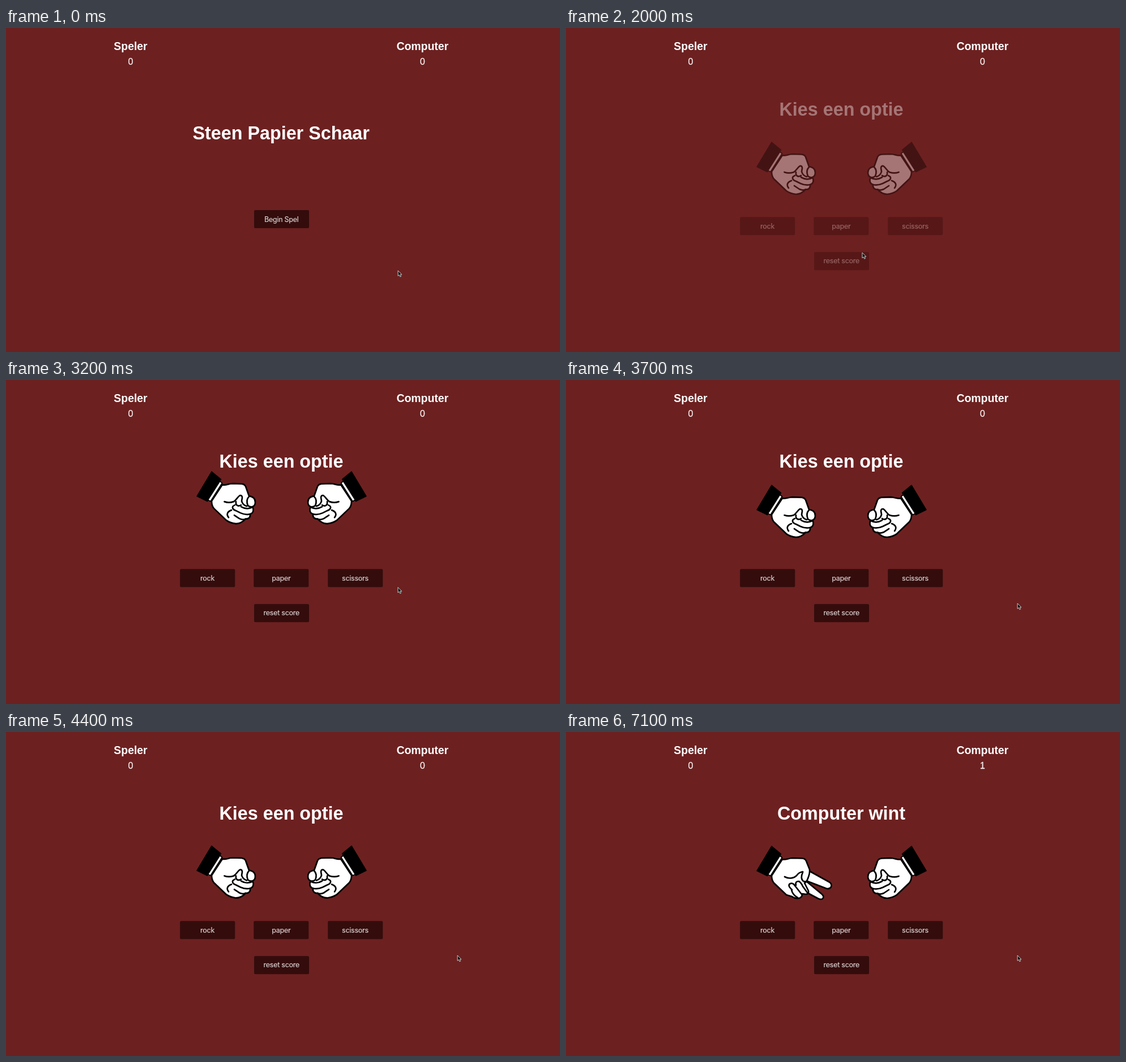
Write an HTML page that moves like this. It is 978 by 573 pixels and loops after 7.2 s.

```html
<!DOCTYPE html>
<html lang="nl">
<head>
<meta charset="utf-8">
<title>Steen Papier Schaar</title>
<style>
  html, body { margin: 0; width: 100%; height: 100%; overflow: hidden; background: #6d2020; }
  svg { display: block; }
  text { text-anchor: middle; fill: #fff; font-family: "Liberation Sans", Arial, sans-serif; }
  .name { font-size: 19.4px; font-weight: 700; }
  .score { font-size: 16.2px; fill: #f4eded; stroke: #f4eded; stroke-width: .3; }
  .title { font-size: 32.3px; font-weight: 700; }
  .button rect { fill: #340c0c; }
  .button text { font: 12.5px Inter, Roboto, sans-serif; letter-spacing: -.02em; fill: #dacfcf; stroke: #dacfcf; stroke-width: .2; }
  .hand { fill: #fff; stroke: #000; stroke-width: 2.7; stroke-linejoin: round; stroke-linecap: round; }
  .line { fill: none; }
  .cuff { fill: #000; stroke-width: 1.5; }
  .band { stroke-width: 1.8; }
</style>
</head>
<body>
<svg width="978" height="573" viewBox="0 0 978 573">
  <defs>
    <g id="sleeve">
      <path class="cuff" d="M363 202L379.500 215.500L355.500 254.500L337 245.500Z"/>
      <path class="band" d="M377.500 219L381.500 222L361 254.500L356.500 252Z"/>
    </g>
    <g id="fist">
      <path d="M382 225C388 227 392 223 400 223L416 223.500Q421 224 423 228L429 245C436 246 440 250 440 256Q440 262 435 264C438 269 437 275 431 277C432 283 428 286 423 285.500C418 291 412 294 406 294Q396 293 389 288L367 267Q363 262 363 254Z"/>
      <path class="line" d="M385.500 255C391 257 396 257 402 255C407 252 409 246 413 244Q417 243.500 417 248L416 254Q418 261 425 263M429 246C424 251 425 257 427 262Q431 265 435 264M406 255C405 262 410 264 415 261M415 264Q425 270 435 265M404 261C397 264 400 269 406 271L414 275Q423 279 431 277M398 270C390 273 389 278 393 283M403 279L412 285Q418 288 423 285.500"/>
    </g>
    <g id="scissors">
      <path d="M423 263L452 287Q457 292 452 295.500Q449 296.500 445 294.500L416 279Z"/>
      <path d="M428 245L465 265.500Q470 269 468 274Q465 278.500 459 276.500L424 263Z"/>
      <path d="M382 225C388 227 392 223 400 223L418 223.500Q422 224 424 228L430 243Q431 249 427 259Q425 265 421 267L428 281Q429 286 424 287L417 286Q417 293 411 294Q404 295 399 291L389 288L367 267Q363 262 363 254Z"/>
      <path class="line" d="M386 256C393 260 402 259 407 254Q411 248 418 247M418 248Q413 259 419 264L425 265M399 279Q390 271 396 268Q401 266 405 273L416 287M406 271Q404 264 411 264Q415 266 418 273L426 284M398 279Q400 288 409 293"/>
    </g>
  </defs>

  <text class="name" x="220" y="38.500">Speler</text>
  <text class="score" x="220" y="64.500">0</text>
  <text class="name" x="735.300" y="38.500">Computer</text>
  <text class="score" x="735.300" y="64.500" id="score">0</text>

  <g id="intro">
    <text class="title" x="485.700" y="197">Steen Papier Schaar</text>
    <g class="button" transform="translate(438 322)"><rect width="97" height="32" rx="2"/><text x="48.300" y="20.500">Begin Spel</text></g>
  </g>

  <g id="match">
    <text class="title" id="result" x="486" y="154.500">Kies een optie</text>
    <g class="hand" id="player">
      <use href="#sleeve"/>
      <use id="choice" href="#fist"/>
    </g>
    <g class="hand" id="computer"><use href="#sleeve"/><use href="#fist"/></g>
    <g class="button" transform="translate(307.200 334.200)"><rect width="97" height="32" rx="2"/><text x="48.300" y="20.800">rock</text></g>
    <g class="button" transform="translate(437.300 334.200)"><rect width="97" height="32" rx="2"/><text x="48.500" y="20.800">paper</text></g>
    <g class="button" transform="translate(568.200 334.200)"><rect width="97" height="32" rx="2"/><text x="48.300" y="20.800">scissors</text></g>
    <g class="button" transform="translate(438 396.200)"><rect width="97" height="32" rx="2"/><text x="48.300" y="20">reset score</text></g>
  </g>

  <g id="cursor">
    <path id="arrow" d="M0 0V9.500L2.200 7.600L3.800 11L5.500 10.200L4 7H6.800Z" fill="#111" stroke="#ddd" stroke-width=".9"/>
    <path id="pointer" d="M-1.200 1Q0 -.8 1.200 1V4L5 5.200Q6.200 6 5.600 8L4.500 10.800H-.6L-3.400 6.500Q-3 4.800 -1.200 6.300Z" fill="#fff" stroke="#222" stroke-width=".8"/>
  </g>
</svg>
<script>
  const LOOP = 7200, STEP = 100;
  const START = 1380, SHAKE = 2895, SHAKE_TIME = 2000, LIFT = -40.4;
  const shakeStops = [0, .15, .25, .35, .5, .65, .75, .85, 1];
  const cursorPath = [
    [500, 692, 429], [1150, 464, 337], [1700, 464, 337], [2200, 555, 430],
    [2500, 633, 384], [2700, 612, 345], [2950, 612, 345], [3500, 797, 395]
  ];
  const $ = id => document.getElementById(id);
  const clamp = v => Math.min(1, Math.max(0, v));

  // CSS "ease": cubic-bezier(.25, .1, .25, 1)
  function ease(p) {
    p = clamp(p);
    const curve = (u, a, b) => 3 * u * (1 - u) ** 2 * a + 3 * u * u * (1 - u) * b + u ** 3;
    let lo = 0, hi = 1;
    for (let i = 0; i < 24; i++) {
      const mid = (lo + hi) / 2;
      if (curve(mid, .25, .25) < p) lo = mid; else hi = mid;
    }
    return curve(lo, .1, 1);
  }

  function shakeOffset(t) {
    const p = (t - SHAKE) / SHAKE_TIME;
    if (p <= 0 || p >= 1) return 0;
    const i = shakeStops.findIndex(s => s > p) - 1;
    const k = ease((p - shakeStops[i]) / (shakeStops[i + 1] - shakeStops[i]));
    return LIFT * (i % 2 ? 1 - k : k);
  }

  function cursorAt(t) {
    const i = cursorPath.findIndex(k => k[0] > t);
    if (i === 0) return cursorPath[0].slice(1);
    if (i < 0) return cursorPath[cursorPath.length - 1].slice(1);
    const [t0, x0, y0] = cursorPath[i - 1], [t1, x1, y1] = cursorPath[i];
    const p = (t - t0) / (t1 - t0), k = p * p * (3 - 2 * p);
    return [x0 + (x1 - x0) * k, y0 + (y1 - y0) * k];
  }

  function draw(t) {
    $("intro").style.opacity = 1 - ease((t - START) / 500);
    $("match").style.opacity = ease((t - START - 500) / 500);

    const done = t >= SHAKE + SHAKE_TIME;
    $("score").textContent = done ? "1" : "0";
    $("result").textContent = done ? "Computer wint" : "Kies een optie";
    $("choice").setAttribute("href", done ? "#scissors" : "#fist");

    const dy = shakeOffset(t);
    $("player").setAttribute("transform", `translate(0 ${dy})`);
    $("computer").setAttribute("transform", `translate(973 ${dy}) scale(-1 1)`);

    const [x, y] = cursorAt(t);
    const [bx, by] = t < 2000 ? [438, 322] : [568, 334];
    const over = x > bx && x < bx + 97 && y > by && y < by + 32;
    $("cursor").setAttribute("transform", `translate(${x} ${y})`);
    $("arrow").style.display = over ? "none" : "";
    $("pointer").style.display = over ? "" : "none";
  }

  const begin = performance.now();
  function tick() {
    const t = (performance.now() - begin) % LOOP;
    draw(Math.floor(t / STEP) * STEP);
    requestAnimationFrame(tick);
  }
  tick();
</script>
</body>
</html>
```
